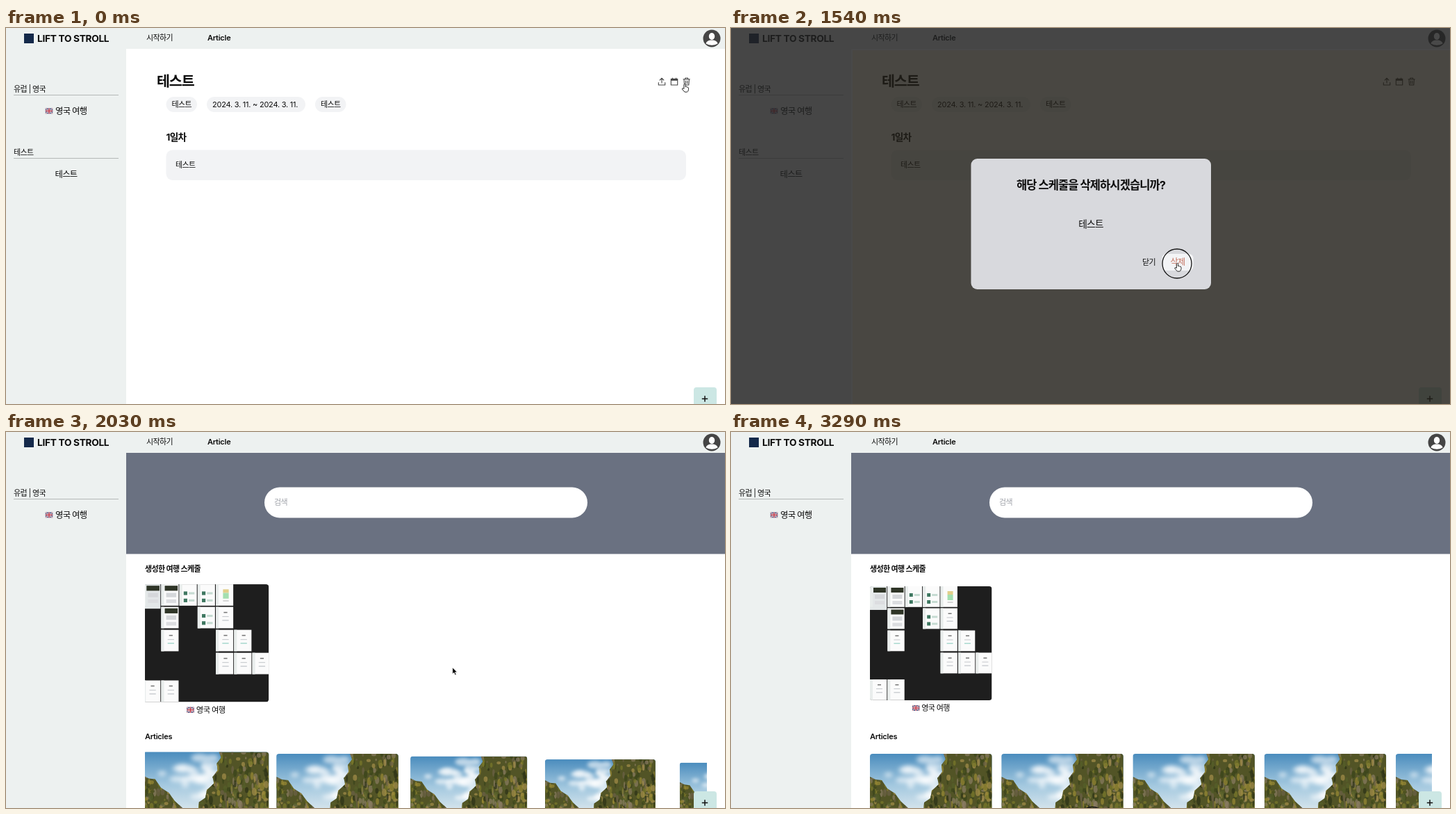
An HTML page for the animation above (3.36 s loop, 1035x541 px).

```html
<!DOCTYPE html>
<html lang="ko">
<head>
<meta charset="utf-8">
<title>Travel planner</title>
<style>
html, body { margin: 0; width: 100%; height: 100%; overflow: hidden; background: #fff; }
svg { display: block; width: 100vw; height: 100vh; }
text { font: 11px Inter, 'Noto Sans CJK KR', 'Noto Sans CJK', sans-serif; letter-spacing: -.055em; fill: #0c0c0c; white-space: pre; }
.latin { letter-spacing: -.022em; }
.mid { text-anchor: middle; }
.icon { fill: none; stroke: #444; stroke-width: 1.1; stroke-linejoin: round; stroke-linecap: round; }
.rule { stroke: #b4b8b7; }
</style>
</head>
<body>
<svg viewBox="0 0 1035 541" id="stage">
  <defs>
    <clipPath id="shelf"><rect x="200" y="176" width="809" height="365"/></clipPath>
    <clipPath id="photoBox"><rect width="175.5" height="130" rx="4"/></clipPath>
    <clipPath id="thumbBox"><rect width="175.5" height="164" rx="4"/></clipPath>
    <clipPath id="cliffs"><path d="M0 33L8 37 17 38 25 50 36 57 44 68 57 80 66 130H0ZM106 0L109 8 103 16 104 26 97 35 99 44 89 53 87 64 78 70 74 130H176V0Z"/></clipPath>
    <linearGradient id="sky" x2="0" y2="1"><stop stop-color="#4a8cbd"/><stop offset=".35" stop-color="#a3c8df"/><stop offset=".65" stop-color="#dce8ee"/></linearGradient>
    <filter id="soft"><feGaussianBlur stdDeviation="3"/></filter>
    <g id="flag">
      <rect width="10.4" height="7.8" rx=".8" fill="#2c3f78"/>
      <path d="M0 0L10.4 7.8M10.4 0L0 7.8" stroke="#e8e4e4" stroke-width="1.5"/>
      <path d="M0 0L10.4 7.8M10.4 0L0 7.8" stroke="#c33444" stroke-width=".5"/>
      <path d="M5.2 0V7.8M0 3.9H10.4" stroke="#eee" stroke-width="2.4"/>
      <path d="M5.2 0V7.8M0 3.9H10.4" stroke="#c33444" stroke-width="1.4"/>
    </g>
    <g id="photo" clip-path="url(#photoBox)"></g>
  </defs>

  <path d="M0 0H1035V30H173V541H0Z" fill="#edf1f0"/>
  <g id="frame"></g>
  <g id="plan"></g>
  <g id="home">
    <rect x="173" y="30" width="862" height="145.5" fill="#6a7181"/>
    <rect x="372" y="79.5" width="465" height="44" rx="22" fill="#fff"/>
    <g id="labels"></g>
    <g clip-path="url(#shelf)"><g id="trip"></g><g id="articles"></g></g>
  </g>
  <g>
    <rect x="990" y="517" width="33" height="40" rx="4" fill="#cce7e4"/>
    <path d="M1006 529.3V537.7M1001.8 533.5H1010.2" stroke="#111" stroke-width="1.5"/>
  </g>
  <g id="shade">
    <path d="M0 0H1035V32H175V541H0Z" fill="#212222" opacity=".82"/>
    <path d="M175 32H1035V541H175Z" fill="#211f19" opacity=".82"/>
  </g>
  <g id="modal">
    <rect x="345.5" y="188" width="345.5" height="188" rx="9" fill="#d8d9dd"/>
    <g id="modalText"></g>
    <g id="confirm">
      <rect x="622.5" y="326" width="41" height="22" rx="5.5"/>
      <text x="643" y="341" class="mid">삭제</text>
    </g>
  </g>
  <circle id="ring" r="21" fill="none" stroke="#111" stroke-width="1.3"/>
  <path id="arrow" d="M0 0V9.6L2.2 7.6 3.8 11.2 5.5 10.4 3.9 7H6.8Z" fill="#000" stroke="#fff" stroke-width=".8"/>
  <path id="hand" d="M-1.1 1Q-1 0 0 0 1 0 1.1 1V4Q2.9 3.5 3.2 4.6 5.4 4.2 5.5 6V8Q5.3 10.8 3.4 11.6H0L-3.6 7.6Q-3.9 6 -2.2 6.2L-1.1 7Z" fill="#fff" stroke="#111" stroke-width=".9"/>
</svg>
<script>
const LOOP = 3360;
const $ = id => document.getElementById(id);
const add = (id, markup) => $(id).insertAdjacentHTML('beforeend', markup);
const clamp = x => Math.min(1, Math.max(0, x));
const show = (id, on) => $(id).style.display = on ? '' : 'none';
const place = (id, x, y, s = 1) => $(id).setAttribute('transform', `translate(${x} ${y}) scale(${s})`);
const zoom = (el, x, y, s) => el.setAttribute('transform', `translate(${x} ${y}) scale(${s}) translate(${-x} ${-y})`);
const text = (x, y, str, size = 11, weight = 400, cls = '', fill = '#0c0c0c') =>
  `<text x="${x}" y="${y}" class="${cls}" style="font-size:${size}px;font-weight:${weight};fill:${fill}">${str}</text>`;
const box = (x, y, w, h, fill, r = 0) =>
  `<rect x="${x}" y="${y}" width="${w}" height="${h}" rx="${r}" fill="${fill}"/>`;

let seed = 7;
const rnd = () => (seed = seed * 16807 % 2147483647) / 2147483647;

function buildFrame() {
  add('frame',
    box(26, 8, 14, 14, '#14294a') +
    text(45, 20, 'LIFT TO STROLL', 13.7, 700, 'latin') +
    text(202, 18, '시작하기', 11, 500) +
    text(290, 18, 'Article', 11, 600, 'latin') +
    text(11, 92, '유럽 | 영국') +
    '<path class="rule" d="M11 96.5H162"/><use href="#flag" x="56.8" y="115.5"/>' +
    text(71, 124, '영국 여행', 12.4, 500) +
    `<circle cx="1016" cy="15" r="12.5" fill="#454545"/>
     <ellipse cx="1016" cy="12" rx="4.2" ry="5" fill="#fff"/>
     <path d="M1007.5 22.5Q1008 18.8 1013.5 17.5H1018.5Q1024 18.8 1024.5 22.5Q1016 27 1007.5 22.5Z" fill="#fff"/>`);
}

function buildPlan() {
  const chip = (x, w, str, cls) => box(x, 99, w, 22, '#f2f3f5', 11) + text(x + 8, 114, str, 11, 400, cls);
  add('plan',
    text(11, 183, '테스트') + '<path class="rule" d="M11 187.5H162"/>' +
    text(86.5, 215, '테스트', 12.4, 500, 'mid') +
    text(217, 84, '테스트', 20.6, 700) +
    chip(230.5, 44.5, '테스트') +
    chip(289, 142, '2024. 3. 11. ~ 2024. 3. 11.', 'latin') +
    chip(445, 44.5, '테스트') +
    text(230.5, 162, '1일차', 13.7, 700) +
    box(230.5, 175.5, 748.5, 43.5, '#f2f3f5', 9) +
    text(244, 201, '테스트') +
    `<g class="icon">
      <path d="M939.3 78.5V82H948.7V78.5M944 79V72.3M941.2 75L944 72.2 946.8 75"/>
      <path d="M957.3 73.3H966.7V82H957.3ZM957.3 75.2H966.7M957.3 74.3H966.7M959.5 72V73M964.5 72V73"/>
      <path d="M975 73.8H984.3M977.8 73.5V72H981.6V73.5M976 74L976.6 82H982.8L983.4 74M978.5 76V80M980.9 76V80"/>
    </g>`);
}

function buildPhoto() {
  const tones = ['#39431a', '#56602a', '#7b7a2c', '#9a8a35', '#6d6148', '#8b7d63', '#2b3116', '#a58f4a'];
  let clouds = '', leaves = '';
  for (let i = 0; i < 26; i++)
    clouds += `<ellipse cx="${20 + rnd() * 85}" cy="${5 + rnd() * 62}" rx="${4 + rnd() * 12}" ry="${3 + rnd() * 6}" fill="#fff" opacity=".6"/>`;
  for (let i = 0; i < 420; i++)
    leaves += `<ellipse cx="${rnd() * 176}" cy="${rnd() * 90}" rx="${1 + rnd() * 2.5}" ry="${1.5 + rnd() * 5}" fill="${tones[rnd() * 8 | 0]}" opacity=".7"/>`;
  add('photo', box(0, 0, 176, 130, 'url(#sky)') + `<g filter="url(#soft)">${clouds}</g>
    <g clip-path="url(#cliffs)">${box(0, 0, 176, 130, '#525426')}${leaves}</g>`);
}

// Small app screens: filled columns for each row of the board.
function buildTrip() {
  const rows = [[0, '01234'], [31.5, '134'], [63.5, '145'], [95.5, '456'], [134, '01']];
  let out = box(0, 0, 175.5, 164, '#1e1e1e');
  rows.forEach(([y, cols], r) => [...cols].forEach(c => {
    const x = c * 25.4, tall = r + +c === 0;
    out += box(x, y, 24.3, tall ? 34 : 29.8, tall ? '#e3e7e8' : '#fbfbfb') + box(x, y, 4, 29.8, '#e9edec');
    if (c < 2 && r < 2) out += box(x + 5, y + 2, 18, 7, '#2f3527') + box(x + 7, y + 12, 14, 6, '#d5d7da') + box(x + 7, y + 21, 14, 5, '#dcdde0');
    else if (c > 1 && c < 4) for (const dy of [10, 20]) out += box(x + 6, y + dy, 5, 5, '#3e7760') + box(x + 13, y + dy + 1, 8, 3, '#c6dbd2');
    else if (r === 0) out += box(x + 10, y + 7, 8, 5, '#e2cf8a') + box(x + 10, y + 12, 8, 8, '#a4dfb0') + box(x + 10, y + 22, 8, 2, '#d5d5d5');
    else out += box(x + 11, y + 7, 5, 1.5, '#777') + box(x + 9, y + 13, 9, 1, '#c5c8cc') + box(x + 9, y + 18, 9, 1.5, r === 2 ? '#a9d9cf' : '#cdd0d4');
  }));
  add('trip', `<g transform="translate(200 222)"><g clip-path="url(#thumbBox)">${out}</g></g>
    <use href="#flag" x="261" y="393.2"/>` + text(274.3, 401, '영국 여행'));
}

function buildHome() {
  add('labels',
    text(386, 105, '검색', 11, 400, '', '#a0a3aa') +
    text(200, 201, '생성한 여행 스케줄', 11, 700) +
    text(200, 442, 'Articles', 11, 600, 'latin'));
  buildPhoto();
  buildTrip();
  for (let i = 0; i < 5; i++)
    add('articles', `<g><use href="#photo" x="${200 + i * 189.2}" y="463"/></g>`);
}

buildFrame();
buildPlan();
buildHome();
add('modalText',
  text(518, 232, '해당 스케줄을 삭제하시겠습니까?', 16.5, 700, 'mid') +
  text(518, 287, '테스트', 13.7, 500, 'mid') +
  text(592, 341, '닫기'));

// Cards grow past full size, then relax at a steady rate.
function cardScale(age) {
  const u = (437 - age) / 87;
  return u > 0 ? 1.05 - .015 * Math.min(u, 5) ** 1.6 : Math.max(1, 1.05 + .0125 * u);
}

// Cursor stops: time, x, y.
const path = [[0, 979, 78.5], [500, 979, 78.5], [1050, 677, 348], [1390, 642.5, 338.5],
  [1680, 642.5, 338.5], [2430, 643, 339], [2730, 580, 456], [3010, 520, 560], [LOOP, 520, 560]];
function cursorAt(t) {
  const i = path.findIndex(p => p[0] > t), [t0, x0, y0] = path[i - 1], [t1, x1, y1] = path[i];
  const k = (t - t0) / (t1 - t0), e = k * k * (3 - 2 * k);
  return [x0 + (x1 - x0) * e, y0 + (y1 - y0) * e];
}

function draw() {
  const t = performance.now() % LOOP;
  const open = t >= 70 && t < 1680, atHome = t >= 1740;
  show('plan', !atHome);
  show('home', atHome);

  const p = 1 - (1 - clamp((t - 40) / 250)) ** 3;
  for (const id of ['shade', 'modal']) {
    show(id, open);
    $(id).setAttribute('opacity', p);
  }
  zoom($('modal'), 518, 282, .9 + .1 * p);

  const [x, y] = cursorAt(t);
  const hover = open && x < 664 && y > 320;
  const h = hover ? clamp((t - 1140) / 150) : 0;
  zoom($('confirm'), 643, 337, 1 + .1 * h);
  $('confirm').children[0].setAttribute('fill', hover ? '#f3f4f6' : '#fff');
  $('confirm').children[1].style.fill = hover ? '#c4715f' : '#0c0c0c';

  if (atHome) {
    zoom($('trip'), 287.75, 311, cardScale(t - 1690));
    [...$('articles').children].forEach((card, i) =>
      zoom(card, 287.75 + i * 189.2, 549.5, cardScale(t - 1690 - i * 87)));
  }

  const pointing = t < 70 || hover;
  show('hand', pointing);
  show('arrow', !pointing);
  if (t < 70) place('hand', 977, 80.5);
  else place(pointing ? 'hand' : 'arrow', x, y);

  const click = t >= 1540 && t < 1680;
  show('ring', click || t >= 3220);
  place('ring', click ? 642 : 520, click ? 339 : 560.5);
  requestAnimationFrame(draw);
}
draw();
</script>
</body>
</html>
```
